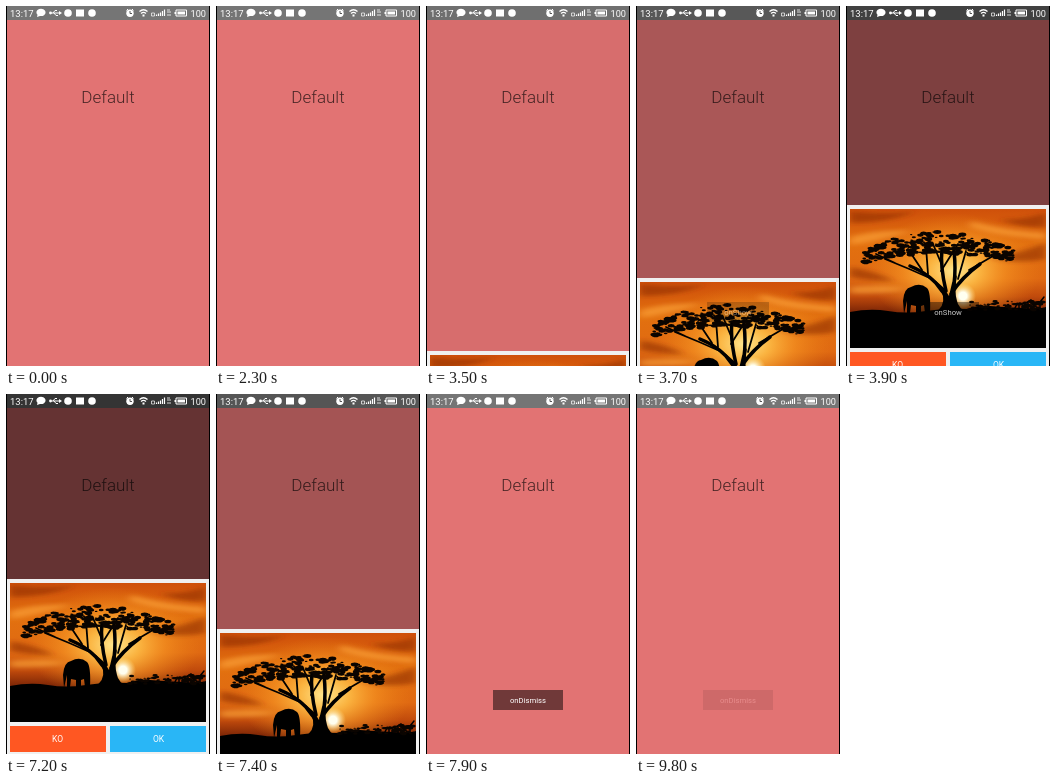
Animation of 204 by 360 pixels, one loop 9.9 s. Source, as an HTML page:

```html
<!DOCTYPE html>
<html lang="en">
<head>
<meta charset="utf-8">
<title>Bottom sheet</title>
<style>
html, body { margin: 0; height: 100%; overflow: hidden; background: #000; }
svg { display: block; width: 100vw; height: 100vh; font-family: Roboto, "Open Sans", sans-serif; }
.label { font-size: 8.5px; fill: #fff; text-anchor: middle; }
.toast { font-size: 7.7px; fill: #fff; text-anchor: middle; }
.line { fill: none; stroke: #fff; }
</style>
</head>
<body>
<svg viewBox="0 0 204 360">
  <defs>
    <linearGradient id="sky" x2="0" y2="1">
      <stop offset="0" stop-color="#cf500a"/>
      <stop offset=".25" stop-color="#e2700f"/>
      <stop offset=".5" stop-color="#e06a12"/>
      <stop offset=".63" stop-color="#c04a0c"/>
      <stop offset=".74" stop-color="#7d2606"/>
    </linearGradient>
    <radialGradient id="glow">
      <stop offset="0" stop-color="#ffe890"/>
      <stop offset=".3" stop-color="#ffc048" stop-opacity=".85"/>
      <stop offset=".6" stop-color="#fca028" stop-opacity=".5"/>
      <stop offset="1" stop-color="#f08a18" stop-opacity="0"/>
    </radialGradient>
    <radialGradient id="sun">
      <stop offset=".3" stop-color="#fffff0"/>
      <stop offset="1" stop-color="#ffe480" stop-opacity="0"/>
    </radialGradient>
    <filter id="soft" x="-.3" y="-.5" width="1.6" height="2"><feGaussianBlur stdDeviation="4 2"/></filter>
    <clipPath id="frame"><path d="M0 0H196V139H0z"/></clipPath>
  </defs>

  <path fill="#e27373" d="M1 0H203V360H1z"/>
  <path fill="#757575" d="M1 0H203V14H1z"/>
  <text x="102" y="97" font-size="17" font-weight="300" text-anchor="middle" fill="#000" fill-opacity=".68">Default</text>
  <path id="shade" d="M1 0H203V360H1z" opacity="0"/>

  <g fill="#fff" font-size="9.500">
    <text x="4" y="10.700">13:17</text>
    <text x="184.500" y="10.700" font-size="9.200">100</text>
    <path d="M31 11L31.500 8.800A4.600 3.700 0 1 1 34 10z"/>
    <g class="line">
      <path d="M44 7H54M47 7L49 4.500H51M48 7L50 9.500H52"/>
      <path d="M133.500 5.500Q137.500 2 141.500 5.500M135 7.500Q137.500 5.300 140 7.500" stroke-width="1.300"/>
      <path d="M145.500 7H148.500V10H145.500z" stroke-width=".7"/>
      <path d="M150.500 10V8.500M152.500 10V7.500M154.500 10V6.500M156.500 10V5M158.500 10V3.500" stroke-width="1.200"/>
      <path d="M161 4H164M161 6H165M161 9H165" stroke-width=".8"/>
      <path d="M170 4H180.500V10H170z"/>
      <path d="M120.500 4.500L122 3M127.500 4.500L126 3"/>
    </g>
    <circle cx="124" cy="7.300" r="3.700"/>
    <path d="M124 5V7.500H126" fill="none" stroke="#555"/>
    <circle cx="44.500" cy="7" r="1.400"/>
    <path d="M53 5L56 7L53 9zM136.500 8.500H138.500V10.500H136.500zM171.500 5.500H179V8.500H171.500zM168.500 6H170V8H168.500z"/>
    <circle cx="62" cy="7" r="3.800"/>
    <path d="M70 3.500H78V10.500H70z"/>
    <circle cx="86" cy="7" r="3.800"/>
  </g>

  <g id="sheet">
    <path fill="#f0f0f0" d="M1 184H203V362H1z"/>
    <g transform="translate(4 188)" clip-path="url(#frame)">
      <path fill="url(#sky)" d="M0 0H196V139H0z"/>
      <ellipse cx="104" cy="62" rx="86" ry="58" fill="url(#glow)"/>
      <g filter="url(#soft)">
        <path fill="#8f2f05" opacity=".6" d="M0 2Q40 6 66 2Q40 14 0 14zM196 34Q165 46 140 48Q165 56 196 50zM196 4Q170 12 150 10Q170 20 196 18zM0 58Q25 62 44 72Q20 72 0 68z"/>
        <path fill="#ffa93c" opacity=".6" d="M0 28Q30 20 62 22Q30 32 0 36zM120 12Q160 22 196 24V30Q150 28 120 18zM0 78Q30 74 56 80Q30 86 0 84z"/>
      </g>
      <circle cx="113" cy="87" r="13" fill="url(#sun)"/>
      <path d="M0 103Q20 99 38 102T76 102T118 100Q128 96 140 97T172 99T196 98V139H0z"/>
      <path d="M54 105L53 92Q54 79 61 78Q70 73 77 79Q81 83 80 104H75L74 96L71 97V104H66V97L61 96L60 104L57 104V92z"/>
      <path d="M84 104Q95 98 93 87L85 71L94 79L99 87L102 74L107 66Q104 82 107 92Q108 99 118 104z"/>
      <g id="tree" stroke="#000" fill="none" stroke-linecap="round">
        <path stroke-width="3.500" d="M92 82Q82 66 60 57M101 85Q112 68 130 55M96 82Q90 57 92 40M104 75Q106 60 104 42"/>
        <path stroke-width="1.800" d="M82 70Q60 60 35 50M72 61L58 40M78 65L76 38M91 62L108 35M108 70L116 42M119 61L143 47M45 54L26 45M91 54L83 35"/>
        <path stroke-width="1.500" d="M164 101L167 95L176 94L181 91M169 96V101M178 93V101M181 101V94L190 93L194 88M190 93V101"/>
      </g>
    </g>
    <path fill="#ff5722" d="M4 331H100V357H4z"/>
    <path fill="#29b6f6" d="M104 331H200V357H104z"/>
    <text class="label" x="51.500" y="347">KO</text>
    <text class="label" x="152.500" y="347">OK</text>
  </g>

  <g id="shown" class="toast">
    <path fill="#000" opacity=".5" d="M71 296H133V316H71z"/>
    <text x="102" y="309.300">onShow</text>
  </g>
  <g id="dismissed" class="toast">
    <path fill="#000" opacity=".5" d="M67 296H137V316H67z"/>
    <text x="102" y="309.300">onDismiss</text>
  </g>
  <path d="M0 0H1V360H0zM203 0H204V360H203z"/>
</svg>
<script>
const LOOP = 9900, STEP = 100, TRAVEL = 176;
const $ = id => document.getElementById(id);
const ramp = (t, from, to) => Math.min(1, Math.max(0, (t - from) / (to - from)));
const smooth = p => p * p * (3 - 2 * p);

let seed = 7;
const random = () => (seed = seed * 16807 % 2147483647) / 2147483647;

// Scatters flat leaf clumps; place(u) gives a centre for u in -1..1
function addLeaves(count, size, place) {
  let d = "";
  for (let i = 0; i < count; i++) {
    const [x, y] = place(random() * 2 - 1);
    const rx = size * (.4 + random());
    const ry = rx * .5;
    d += `M${x - rx} ${y}a${rx} ${ry} 0 1 0 ${2 * rx} 0a${rx} ${ry} 0 1 0 ${-2 * rx} 0`;
  }
  const path = document.createElementNS("http://www.w3.org/2000/svg", "path");
  path.setAttribute("d", d);
  path.setAttribute("fill", "#0a0400");
  path.setAttribute("stroke", "none");
  $("tree").append(path);
}
addLeaves(270, 3, u => [89 + u * 75, 23 + 18 * u * u + random() * (24 - 10 * Math.abs(u))]);
addLeaves(70, 2.5, u => [157 + u * 38, 101 - random() * 9]);

function draw(t) {
  const open = smooth(ramp(t, 3390, 4010));
  const close = ramp(t, 7165, 7600) ** 2;
  $("sheet").setAttribute("transform", `translate(0 ${Math.round(TRAVEL * (1 - open + close))})`);
  $("shade").setAttribute("opacity", .6 * (ramp(t, 3450, 4060) - ramp(t, 7165, 7600)));
  $("shown").setAttribute("opacity", ramp(t, 3500, 4000) - ramp(t, 5250, 5900));
  $("dismissed").setAttribute("opacity", ramp(t, 7500, 7900) - ramp(t, 9300, 9900));
}

function tick() {
  const t = performance.now() % LOOP;
  draw(Math.floor(t / STEP) * STEP);
  requestAnimationFrame(tick);
}
tick();
</script>
</body>
</html>
```
